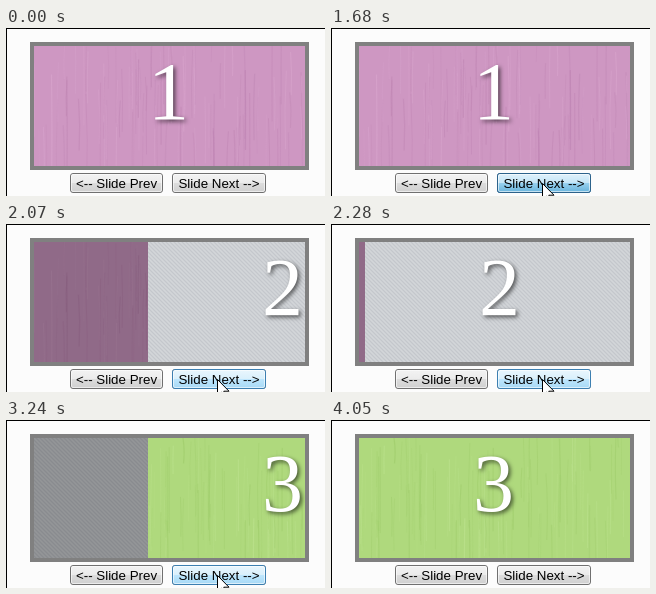
These frames come from a looping animation (319 by 168 pixels, 4770 ms). An HTML page:

```html
<!DOCTYPE html>
<html lang="en">
<head>
<meta charset="utf-8">
<title>Slide cover transition</title>
<style>
  html, body { margin: 0; width: 100%; height: 100%; overflow: hidden; background: #fcfcfc; }
  svg { display: block; width: 319px; height: 168px; }
  .digit { font: 82px "Liberation Serif", "Times New Roman", serif; fill: #fff;
    filter: drop-shadow(2px 2px 2px rgba(0, 0, 0, .6)); }
  .label { font: 13.33px "Liberation Sans", Arial, sans-serif; fill: #000; text-anchor: middle; }
</style>
</head>
<body>
<svg viewBox="0 0 319 168">
  <defs>
    <linearGradient id="plain" x2="0" y2="1">
      <stop offset="0" stop-color="#f3f3f3"/><stop offset=".5" stop-color="#ebebeb"/>
      <stop offset=".5" stop-color="#dddddd"/><stop offset="1" stop-color="#cfcfcf"/>
    </linearGradient>
    <linearGradient id="hover" x2="0" y2="1">
      <stop offset="0" stop-color="#eaf6fd"/><stop offset=".5" stop-color="#d9f0fc"/>
      <stop offset=".5" stop-color="#bee6fd"/><stop offset="1" stop-color="#a7d9f5"/>
    </linearGradient>
    <linearGradient id="press" x2="0" y2="1">
      <stop offset="0" stop-color="#e0f1fb"/><stop offset=".5" stop-color="#c4e5f6"/>
      <stop offset=".5" stop-color="#98d1ef"/><stop offset="1" stop-color="#68b3db"/>
    </linearGradient>
    <pattern id="weave" width="4" height="4" patternUnits="userSpaceOnUse">
      <rect width="4" height="4" fill="#cdd0d4"/>
      <path d="M0 0L4 4" stroke="#c3c6cb" stroke-width=".9"/>
      <path d="M0 2L2 4M2 0L4 2" stroke="#d5d8db" stroke-width=".7"/>
    </pattern>
    <clipPath id="view"><rect x="28" y="18" width="271" height="120"/></clipPath>
  </defs>
  <rect width="319" height="168" fill="#fcfcfc"/>
  <path d="M0 .5H319M.5 0V168" stroke="#000"/>
  <rect x="24" y="14" width="279" height="128" fill="#808080"/>
  <g id="slides" clip-path="url(#view)"></g>
  <g id="buttons"></g>
  <path id="cursor" d="M.5 .5V16.5L4.2 13L6.8 19L9.3 18L6.8 12.2H12Z" fill="#fff" stroke="#000"/>
</svg>
<script>
const NS = 'http://www.w3.org/2000/svg';
const LOOP = 4770, TICK = 30;
const LEFT = 28, TOP = 18, W = 271, H = 120;
const MOVE = 720, CLICKS = [1690, 2860];   // travel time and start of each change
const STARTS = [1800, 2970];               // first visible movement
const $ = id => document.getElementById(id);

function add(parent, tag, attrs, text) {
  const el = document.createElementNS(NS, tag);
  for (const k in attrs) el.setAttribute(k, attrs[k]);
  if (text) el.textContent = text;
  parent.appendChild(el);
  return el;
}

function random(seed) {
  return () => (seed = (seed * 16807) % 2147483647) / 2147483647;
}

function grain(parent, seed, dark, light) {
  const rnd = random(seed);
  for (let i = 0; i < 110; i++) {
    const x = LEFT + rnd() * W, y = TOP - 20 + rnd() * 110, len = 25 + rnd() * 75;
    const bend = (rnd() - .5) * 5;
    add(parent, 'path', {
      d: `M${x} ${y}q${bend} ${len / 2} ${bend / 3} ${len}`, fill: 'none',
      stroke: rnd() < .6 ? dark : light, 'stroke-width': .5 + rnd() * .8,
      opacity: .25 + rnd() * .4
    });
  }
}

function makeSlide(digit, fill, seed, dark, light) {
  const g = add($('slides'), 'g', {});
  const box = { x: LEFT, y: TOP, width: W, height: H };
  add(g, 'rect', { ...box, fill });
  if (seed) grain(g, seed, dark, light);
  add(g, 'text', { x: 142, y: 91, class: 'digit' }, digit);
  const shade = add(g, 'rect', { ...box, fill: '#000', opacity: 0 });
  return { g, shade };
}

function makeButton(x, width, label) {
  const face = (fill, stroke) => {
    const g = add($('buttons'), 'g', {});
    add(g, 'rect', { x: x + .5, y: 145.5, width: width - 1, height: 19, rx: 2.5, fill, stroke });
    add(g, 'rect', { x: x + 1.5, y: 146.5, width: width - 3, height: 17, rx: 1.5,
      fill: 'none', stroke: '#fff', opacity: .6 });
    return g;
  };
  const faces = [face('url(#plain)', '#707070'), face('url(#hover)', '#3c7fb1'),
    face('url(#press)', '#2c628b')];
  add($('buttons'), 'text', { x: x + width / 2, y: 160, class: 'label' }, label);
  faces[1].setAttribute('opacity', 0);
  faces[2].setAttribute('opacity', 0);
  return faces;
}

const slides = [
  makeSlide('1', '#ce97c2', 71, '#bf85b3', '#d8a5cd'),
  makeSlide('2', 'url(#weave)'),
  makeSlide('3', '#afd97d', 523, '#9ecb6a', '#bce28e')
];
makeButton(64, 93, '<-- Slide Prev');
const next = makeButton(166, 94, 'Slide Next -->');

const clamp = v => Math.max(0, Math.min(1, v));
const span = (t, a, b) => clamp((t - a) / (b - a));
const easeInOut = p => p < .5 ? 4 * p ** 3 : 1 - 4 * (1 - p) ** 3;
const easeOut = p => 1 - (1 - p) ** 2;

function drawSlides(t) {
  CLICKS.forEach((click, i) => {
    const p = t < STARTS[i] ? 0 : easeInOut(span(t, click, click + MOVE));
    slides[i + 1].g.setAttribute('transform', `translate(${Math.round(W * (1 - p))} 0)`);
    slides[i].shade.setAttribute('opacity', .3 * span(t, STARTS[i] - TICK, STARTS[i] + 170));
  });
}

function drawButton(t) {
  const hover = span(t, 780, 1050) * (1 - span(t, 3800, 4050));
  const press = t < 2400
    ? (t >= 1680) * (1 - span(t, 1770, 1950))
    : (t >= 2910) * (1 - span(t, 2940, 3120));
  next[1].setAttribute('opacity', hover);
  next[2].setAttribute('opacity', press);
}

function drawCursor(t) {
  const shown = t >= 720 && t < 4050;
  let x, y;
  if (t < 3600) {
    const p = easeOut(span(t, 690, 960));
    x = 226 - 15 * p;
    y = 170 - 15 * p;
  } else {
    const p = span(t, 3600, 4020) ** 1.7;
    x = 211 + 84 * p;
    y = 155 + 4 * p;
  }
  $('cursor').setAttribute('visibility', shown ? 'visible' : 'hidden');
  $('cursor').setAttribute('transform', `translate(${Math.round(x)} ${Math.round(y)})`);
}

function draw(ms) {
  const t = Math.floor((ms % LOOP) / TICK + .01) * TICK;
  drawSlides(t);
  drawButton(t);
  drawCursor(t);
}

const begin = performance.now();
function frame() {
  draw(performance.now() - begin);
  requestAnimationFrame(frame);
}
frame();
</script>
</body>
</html>
```
